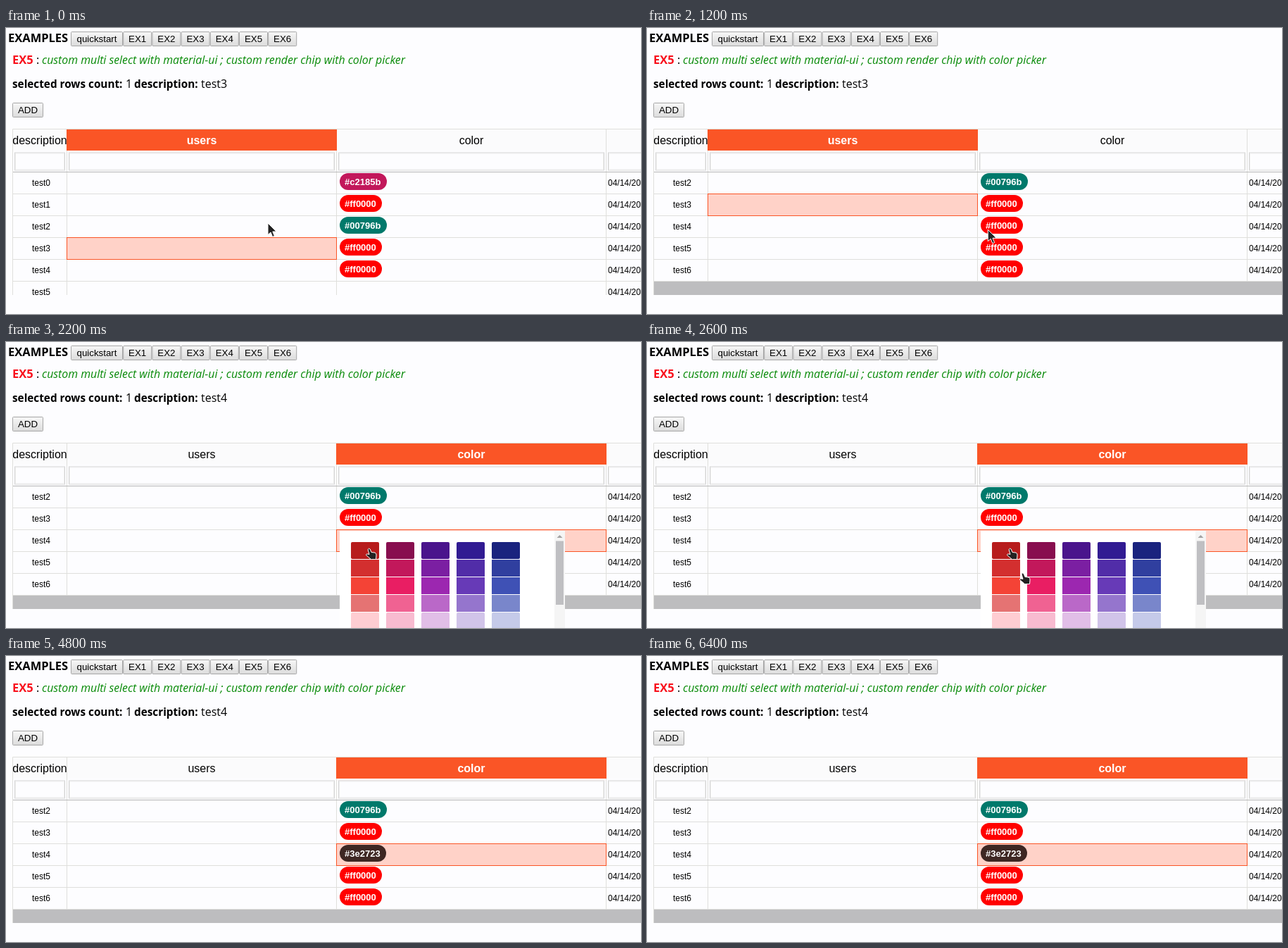
Recreate the animation shown at these times as an HTML page. Size 902 by 406 pixels, loop 7800 ms.

```html
<!DOCTYPE html>
<html lang="en">
<head>
<meta charset="utf-8">
<title>Editable table with color picker</title>
<style>
html, body { margin: 0; width: 100%; height: 100%; overflow: hidden; background: #fdfdff; }
svg { display: block; font: 16px "Liberation Sans", Arial, sans-serif; }
.ui { font-family: "Open Sans", "Noto Sans", sans-serif; }
.b { font-weight: bold; }
.mid { text-anchor: middle; }
.btn { font-size: 13.33px; text-anchor: middle; }
.cell { font-size: 12px; }
.chip { font: bold 13px "Liberation Sans", Arial, sans-serif; fill: #fff; }
</style>
</head>
<body>
<svg id="stage" width="902" height="406" viewBox="0 0 902 406"></svg>
<script>
const LOOP = 7800, STEP = 200, ROW = 31, TOP = 205;
const COLS = [10, 87, 470, 853];
const ACCENT = '#fa5526', LINE = '#dfdfdc';

// Material swatches, dark to light
const SWATCHES = `b71c1c d32f2f f44336 e57373 ffcdd2
880e4f c2185b e91e63 f06292 f8bbd0
4a148c 7b1fa2 9c27b0 ba68c8 e1bee7
311b92 512da8 673ab7 9575cd d1c4e9
1a237e 303f9f 3f51b5 7986cb c5cae9
0d47a1 1976d2 2196f3 64b5f6 bbdefb
01579b 0288d1 03a9f4 4fc3f7 b3e5fc
006064 0097a7 00bcd4 4dd0e1 b2ebf2
004d40 00796b 009688 4db6ac b2dfdb
194d33 388e3c 4caf50 81c784 c8e6c9
33691e 689f38 8bc34a aed581 dcedc8
827717 afb42b cddc39 dce775 f0f4c3
f57f17 fbc02d ffeb3b fff176 fff9c4
ff6f00 ffa000 ffc107 ffd54f ffecb3
e65100 f57c00 ff9800 ffb74d ffe0b2
bf360c e64a19 ff5722 ff8a65 ffccbc
3e2723 5d4037 795548 a1887f d7ccc8
263238 455a64 607d8b 90a4ae cfd8dc
000000 525252 969696 d9d9d9 ffffff`.split('\n').map(g => g.split(' '));

const rect = (x, y, w, h, fill, more = '') =>
  `<rect x="${x}" y="${y}" width="${w}" height="${h}" fill="${fill}" ${more}/>`;
const text = (x, y, s, cls = '', more = '') =>
  `<text x="${x}" y="${y}" class="${cls}" ${more}>${s}</text>`;
const path = (d, fill, more = '') => `<path d="${d}" fill="${fill}" ${more}/>`;
const size = px => `style="font-size:${px}px"`;

function button(x, y, w, h, label) {
  return rect(x + .5, y + .5, w - 1, h - 1, 'url(#face)', 'stroke="#a6a6a6" rx="1"') +
    text(x + w / 2, y + h / 2 + 4.5, label, 'btn');
}

function pageTop(name) {
  const tabs = [1, 2, 3, 4, 5, 6].map(i => button(125 + i * 41.2, 5, 41, 21, 'EX' + i)).join('');
  return text(3, 20, 'EXAMPLES', 'ui b', size(16.5)) +
    button(92, 5, 74, 21, 'quickstart') + tabs +
    text(9, 51, 'EX5', 'ui b', 'fill="#f8101c" ' + size(16.5)) + text(43, 51, ':', 'ui') +
    text(51, 51, 'custom multi select with material-ui ; custom render chip with color picker',
      'ui', 'fill="#078a07" font-style="italic" ' + size(15.89)) +
    text(9, 85, 'selected rows count:', 'ui b', size(15.3)) + text(170, 85, '1', 'ui') +
    text(182, 85, 'description:', 'ui b', size(15.3)) + text(277, 85, name, 'ui') +
    button(9, 106, 44, 21, 'ADD');
}

function tableHead(active) {
  let s = rect(10, 144, 892, 30, '#fbfbfc') +
    path('M9.5 379V143.5H902M86.5 144V205M469.5 144V205M852.5 144V205', 'none', `stroke="${LINE}"`);
  ['description', 'users', 'color', ''].forEach((label, i) => {
    const x = COLS[i], w = (COLS[i + 1] || 960) - x, on = i === active;
    if (on) s += rect(x - 1, 144, w + 1, 30, ACCENT);
    s += text(x + w / 2 - .5, 165, label, on ? 'mid b' : 'mid', on ? 'fill="#fff"' : '');
    s += rect(x + 2.5, 177, w - 6, 25, '#fdfdff', 'stroke="#d4d4d4"') +
      rect(x + 3.5, 178, w - 8, 23, 'none', 'stroke="#eee"');
  });
  return s + path('M10 204.5H902', 'none', 'stroke="#b8b8b8"');
}

function chip(y, color) {
  const w = { '#ff0000': 60, '#3e2723': 66 }[color] || 67;
  return rect(474, y + 1, w, 24, color, 'rx="12"') + text(481, y + 18, color, 'chip');
}

function tableBody(scroll, row, col, picked) {
  // Chips exist only for rows that have been fully in view
  const drawn = scroll ? 7 : 5;
  let s = rect(10, TOP, 892, 174, '#bdbdbf');
  for (let i = 0; i < 7; i++) {
    const y = TOP + i * ROW - scroll;
    const color = { 0: '#c2185b', 2: '#00796b', 4: picked }[i] || '#ff0000';
    s += rect(10, y, 892, ROW, '#fdfdff') +
      path(`M10 ${y + 30.5}H902M86.5 ${y}v31M469.5 ${y}v31M852.5 ${y}v31`, 'none', `stroke="${LINE}"`);
    if (i === row) s += rect(COLS[col] - .5, y - .5, 383, ROW, '#ffd2c8', `stroke="${ACCENT}"`);
    s += text(50, y + 19, 'test' + i, 'cell mid') + text(855, y + 19, '04/14/20', 'cell');
    if (i < drawn) s += chip(y, color);
  }
  return `<g clip-path="url(#body)">${s}</g>`;
}

function picker(scroll) {
  let s = rect(474, 268, 320, 240, '#fff');
  SWATCHES.forEach((group, g) => group.forEach((c, k) => {
    const x = 490 + g % 5 * 50, y = 284 + Math.floor(g / 5) * 135 + k * 25 - scroll;
    s += rect(x, y, 40, 24, '#' + c, k % 4 ? '' : 'rx="2"');
  }));
  s += rect(779, 268, 15, 240, '#f5f5f5') +
    rect(781, 282.5 + scroll * 122 / 322, 11, 90.5, '#bfbfc2') +
    path('M782.5 278h8l-4 -4z', scroll ? '#505050' : '#a3a3a3');
  return `<g clip-path="url(#popup)">${s}</g>`;
}

const cursor = (x, y, d) =>
  `<g transform="translate(${x} ${y})">${path(d, '#222', 'stroke="#fff" stroke-linejoin="round"')}</g>`;
const arrow = (x, y) => cursor(x, y, 'M0 0V16.5L4 13L6.6 19.5L9.4 18.3L6.8 12H12Z');
const hand = (x, y) => cursor(x, y,
  'M0 1.5Q1.5 -1 3.2 1L5 5.5L10 6Q12.5 7 12 10L11.5 15.5H4.5L-2.5 9.5Q-2.5 7 2 8.5Z');

const DEFS = `<defs>
<linearGradient id="face" x2="0" y2="1"><stop stop-color="#f7f7f7"/><stop offset="1" stop-color="#dcdcdc"/></linearGradient>
<clipPath id="body">${rect(0, TOP, 902, 174, '#000')}</clipPath>
<clipPath id="popup">${rect(474, 268, 320, 240, '#000')}</clipPath>
</defs>`;

// Value of the last [time, value] pair already reached
const at = (t, keys) => keys.filter(k => k[0] <= t).pop()[1];

function pointer(t) {
  if (t < 2200) {
    const u = Math.min(1, Math.max(0, (t - 600) / 800));
    const e = u * u * (3 - 2 * u);
    return arrow(372 + 133 * e, 277 + 11 * e);
  }
  if (t < 2600) return hand(514, 293);
  if (t < 2800) return hand(514, 293) + hand(532, 328);
  return t < 3000 ? hand(545, 372) : '';
}

function scene(t) {
  const moved = t >= 1800, open = t >= 2200 && t < 4800;
  const scroll = Math.min(62, t / STEP * ROW);
  const listScroll = at(t, [[0, 0], [3600, 51], [3800, 160], [4000, 270], [4200, 322]]);
  return DEFS + pageTop(moved ? 'test4' : 'test3') + tableHead(moved ? 2 : 1) +
    tableBody(scroll, moved ? 4 : 3, moved ? 2 : 1, t >= 4800 ? '#3e2723' : '#ff0000') +
    (open ? picker(listScroll) : '') + pointer(t);
}

const stage = document.getElementById('stage');
const start = performance.now();
let shown = -1;
function draw() {
  const t = Math.floor((performance.now() - start) % LOOP / STEP) * STEP;
  if (t !== shown) stage.innerHTML = scene(shown = t);
  requestAnimationFrame(draw);
}
draw();
</script>
</body>
</html>
```
